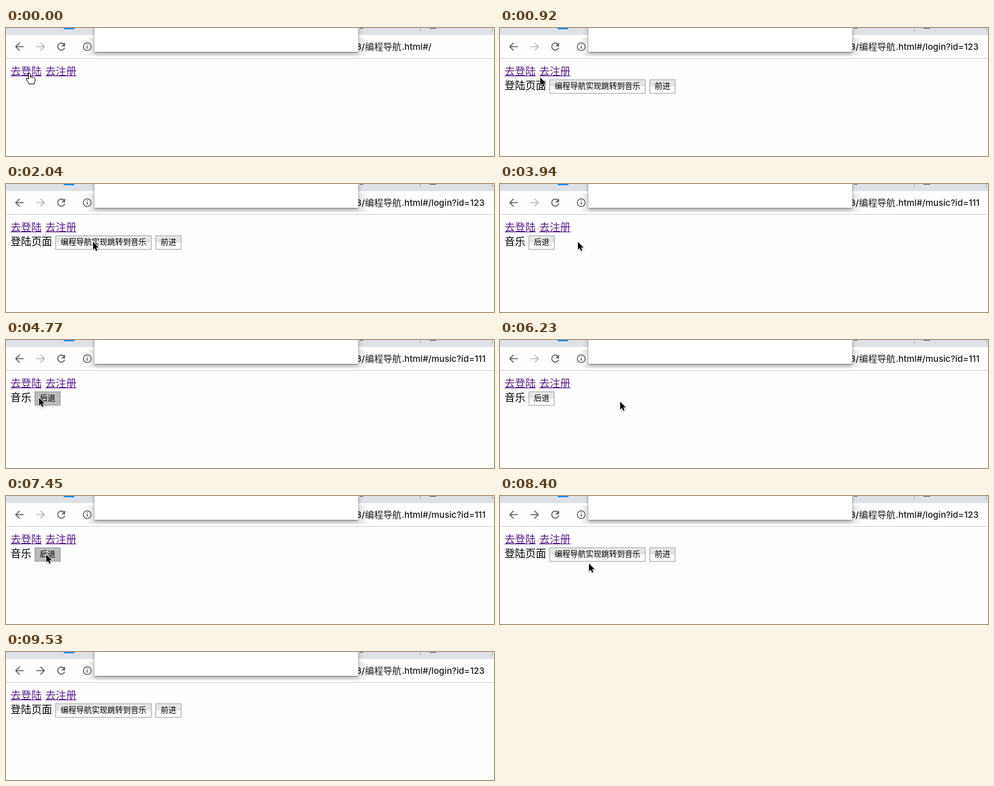
Animation of 751x199 px, one loop 9.63 s. Source, as an HTML page:

```html
<!DOCTYPE html>
<html lang="zh-CN">
<head>
<meta charset="utf-8">
<title>编程导航</title>
<style>
  html, body { margin: 0; width: 100%; height: 100%; overflow: hidden; background: #fefefe; }
  svg { display: block; width: 751px; height: 199px; }
  text { font-family: "Noto Sans CJK SC", "Noto Sans CJK", "Noto Sans", sans-serif; font-size: 16px; fill: #000; }
  .url text { font-size: 14px; font-weight: 500; fill: #18191b; }
  .url .latin { font-family: Inter, Roboto, sans-serif; font-size: 13.5px; }
  .icon { fill: none; stroke: #5f6368; stroke-width: 1.6; }
  .icon.off { stroke: #babcbe; }
  .link text { fill: #551a8b; }
  .link path { stroke: #551a8b; }
  .link.active text { fill: #e00; }
  .link.active path { stroke: #e00; }
  .button text { font-size: 12px; font-weight: 500; }
  .button rect { fill: url(#face); stroke: #a6a6a6; }
  .button.active rect { fill: #bababa; stroke: #9a9a9a; }
  .popup { fill: #fff; filter: drop-shadow(0 1px 1px rgba(0, 0, 0, .3)) drop-shadow(0 3px 3px rgba(0, 0, 0, .28)); }
  #arrow { filter: drop-shadow(0 1px 1px rgba(0, 0, 0, .3)); }
</style>
</head>
<body>
<svg viewBox="0 0 751 199">
  <defs>
    <linearGradient id="face" x2="0" y2="1">
      <stop offset="0" stop-color="#ebebeb"/>
      <stop offset=".45" stop-color="#dfdfdf"/>
      <stop offset=".5" stop-color="#f8f8f8"/>
      <stop offset="1" stop-color="#fff"/>
    </linearGradient>
  </defs>

  <!-- browser chrome -->
  <rect width="751" height="11" fill="#dee1e6"/>
  <rect x="89" width="16" height="2" fill="#1a8cf0"/>
  <path d="M545 .5h5M652 .5h10" stroke="#55585c"/>
  <path d="M637.5 0v5M748.5 0v5" stroke="#a5a8ad"/>
  <path d="M0 47.5h751" stroke="#d2d2d2"/>
  <rect x="127" y="15" width="426" height="28" fill="#eeeff0"/>
  <path class="icon" d="M27.5 29H15.5M21 23l-6 6 6 6"/>
  <path class="icon" id="forward" d="M46.5 29H58.5M53 23l6 6-6 6"/>
  <path class="icon" d="M89.2 25.2A5.5 5.5 0 1 0 90.4 30.4"/>
  <path d="M91 22.5v6h-6z" fill="#5f6368"/>
  <circle class="icon" cx="125" cy="29" r="6" style="stroke-width:1.4"/>
  <path class="icon" d="M125 28v4.3M125 25.2v1.6"/>
  <g class="url">
    <text class="latin" x="538.7" y="34">3/</text>
    <text x="552.5" y="34">编程导航</text>
    <text class="latin" id="route" x="609" y="34"></text>
  </g>
  <rect class="popup" x="136" y="-20" width="406" height="57"/>

  <!-- page -->
  <g class="link" id="toLogin"><text x="7" y="73">去登陆</text><path d="M7 74.5h48"/></g>
  <g class="link"><text x="60.5" y="73">去注册</text><path d="M60.5 74.5h48"/></g>
  <g id="login">
    <text x="7" y="95">登陆页面</text>
    <g class="button" id="toMusic"><rect x="76.5" y="80.5" width="147" height="21"/><text x="84" y="95">编程导航实现跳转到音乐</text></g>
    <g class="button" id="goForward"><rect x="230.5" y="80.5" width="39" height="21"/><text x="238" y="95">前进</text></g>
  </g>
  <g id="music">
    <text x="7" y="95">音乐</text>
    <g class="button" id="goBack"><rect x="44.5" y="80.5" width="39" height="21"/><text x="52" y="95">后退</text></g>
  </g>

  <g id="cursor">
    <path id="hand" fill="#fff" stroke="#000" stroke-linejoin="round"
      d="M-1.5 1q1.5-2 3 0V6.5q1.6-1.4 2.6.3q1.6-1 2.6.6q1.8-.6 2.3 1.2V11q0 2-1.5 3.5V17H-1V15.5L-4.6 10.2q-1-2 .6-2.4q1.2-.2 2.5 1.7z"/>
    <path id="arrow" fill="#000" stroke="#fff" stroke-width="1.6" paint-order="stroke"
      d="M1 1V13L3.7 10.5L5.6 15L7.6 14.1L5.7 9.7H9.6z"/>
  </g>
</svg>
<script>
const LOOP = 9630;
const STEP = 60; // the cursor is redrawn at this interval
const ARROW_FROM = 920;
const $ = id => document.getElementById(id);

const clicks = [
  { down: 120, done: 260, on: 'toLogin', opens: 'login' },
  { down: 2820, done: 2990, on: 'toMusic', opens: 'music' },
  { down: 4770, done: 4890, on: 'goBack', opens: 'login' },
  { down: 5710, done: 5830, on: 'goForward', opens: 'music' },
  { down: 7450, done: 7570, on: 'goBack', opens: 'login' }
];
const routes = { login: 'login?id=123', music: 'music?id=111' };

// Each glide starts where the one before it ended; "via" bends the path.
const rest = { x: 36, y: 70 };
const glides = [
  { from: 500, until: 620, x: 48, y: 72 },
  { from: ARROW_FROM, until: 1150, x: 114, y: 91 },
  { from: 1930, until: 2040, x: 133, y: 89 },
  { from: 3940, until: 4230, x: 50, y: 89 },
  { from: 5130, until: 5530, x: 234, y: 91, via: { x: 142, y: 98 } },
  { from: 5890, until: 6060, x: 190, y: 96 },
  { from: 6110, until: 6350, x: 180, y: 95 },
  { from: 6530, until: 7390, x: 61, y: 90, via: { x: 460, y: 190 } },
  { from: 8400, until: 8810, x: 660, y: 205 }
];

const bend = (a, c, b, k) => (1 - k) ** 2 * a + 2 * k * (1 - k) * c + k * k * b;

function cursorAt(t) {
  let at = rest;
  for (const to of glides) {
    if (t < to.from) break;
    const steps = Math.round((to.until - to.from) / STEP) + 1;
    const gap = (to.until - to.from) / (steps - 1);
    const k = Math.min(1, (Math.floor((t - to.from) / gap + 1e-6) + 1) / steps);
    const via = to.via || { x: (at.x + to.x) / 2, y: (at.y + to.y) / 2 };
    at = { x: bend(at.x, via.x, to.x, k), y: bend(at.y, via.y, to.y, k) };
  }
  return at;
}

const show = (id, on) => $(id).style.display = on ? '' : 'none';

function draw(t) {
  const last = clicks.filter(c => t >= c.done).pop() || {};
  $('route').textContent = '.html#/' + (routes[last.opens] || '');
  $('forward').classList.toggle('off', last.on !== 'goBack');
  show('login', last.opens === 'login');
  show('music', last.opens === 'music');

  const held = clicks.find(c => t >= c.down && t < c.done);
  for (const { on } of clicks) $(on).classList.toggle('active', held?.on === on);

  const { x, y } = cursorAt(t);
  $('cursor').setAttribute('transform', `translate(${Math.round(x)} ${Math.round(y)})`);
  show('hand', t < ARROW_FROM);
  show('arrow', t >= ARROW_FROM);
}

const begin = performance.now();
function tick() {
  draw((performance.now() - begin) % LOOP);
  requestAnimationFrame(tick);
}
tick();
</script>
</body>
</html>
```
